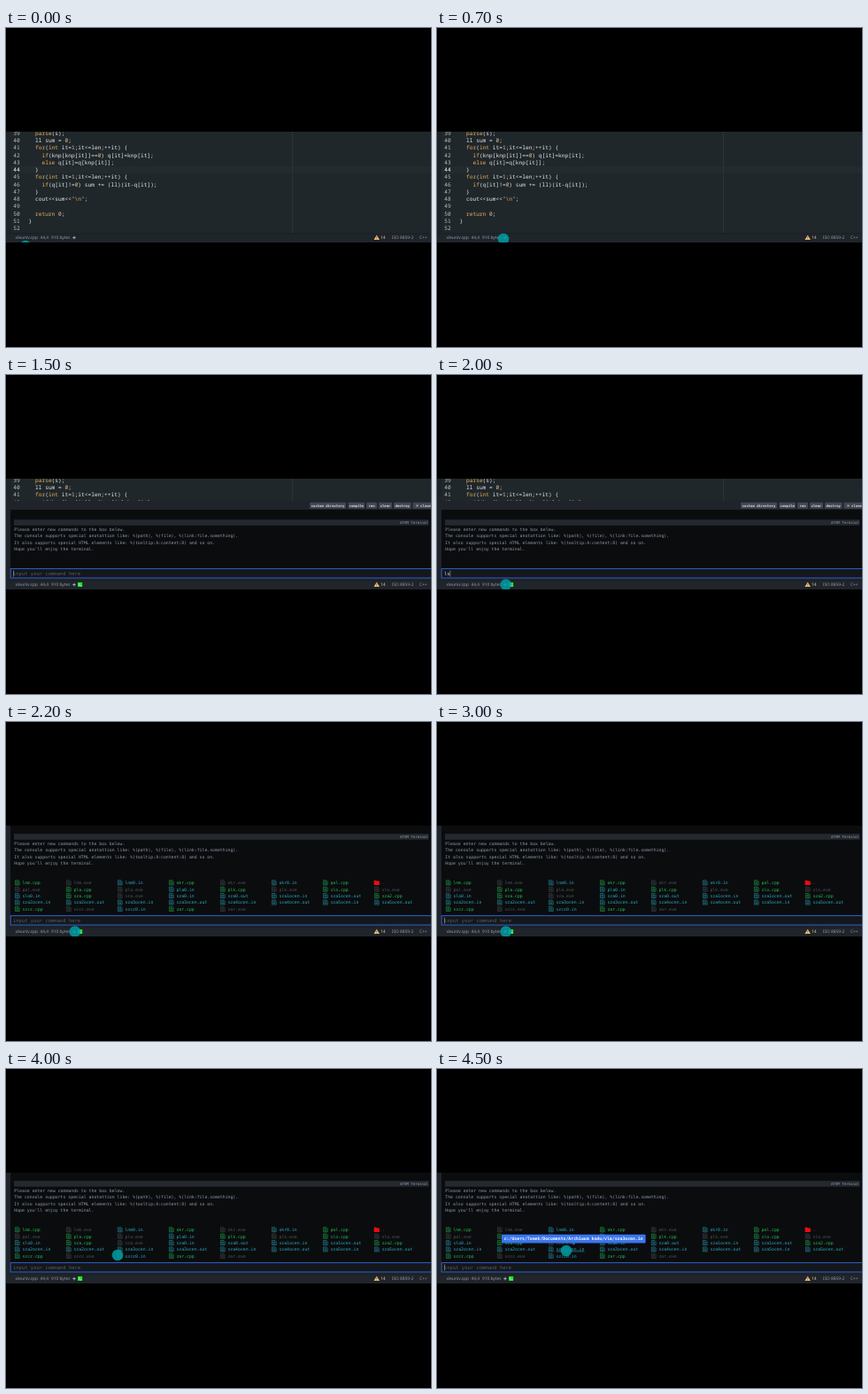
These frames come from a looping animation (480 px wide and 360 px high, 4.7 s). An HTML page:

```html
<!DOCTYPE html>
<html lang="en">
<head>
<meta charset="utf-8">
<title>Editor terminal</title>
<style>
  html, body { margin: 0; width: 100%; height: 100%; overflow: hidden; background: #000; }
  svg { display: block; width: 480px; height: 360px; }
  text { white-space: pre; text-rendering: geometricPrecision; }
  .code { font: 6.2px "Noto Sans Mono", "DejaVu Sans Mono", monospace; fill: #e4e6e6; }
  .term { font: 4.83px "DejaVu Sans Mono", monospace; fill: #8d9aad; }
  .input { font: 5.5px "DejaVu Sans Mono", monospace; }
  .status { font: 4.8px "Noto Sans", "Open Sans", sans-serif; }
  .button { font: bold 3.9px "DejaVu Sans Mono", monospace; fill: #d5d9df; text-anchor: middle; }
</style>
</head>
<body>
<svg id="stage" viewBox="0 0 480 360">
  <defs><clipPath id="strip"><rect y="117" width="480" height="125"/></clipPath></defs>
  <rect width="480" height="360"/>
  <g clip-path="url(#strip)">
    <g id="editor">
      <rect y="117" width="480" height="115" fill="#20272b"/>
      <rect y="117" width="5" height="115" fill="#1d2327"/>
      <rect x="5" y="155.8" width="475" height="8.2" fill="#232b2f"/>
      <rect x="323" y="117" width="1" height="115" fill="#2b3337"/>
    </g>
    <rect id="codeCaret" x="36.8" y="156" width=".8" height="7.6" fill="#e8eaea"/>
    <g id="panel">
      <rect id="panelFrame" width="480" fill="#20242a"/>
      <rect id="panelBody" x="5" width="475" fill="#0b0c0e"/>
      <g id="toolbar"></g>
      <g id="output">
        <rect x="9" y="163.2" width="468.5" height="6.6" fill="#24292f"/>
        <text class="term" x="477" y="168" text-anchor="end" style="font-size:4.1px">ATOM Terminal</text>
      </g>
      <g id="files"></g>
      <rect x="5.2" y="218.6" width="480" height="10.4" fill="#14171c" stroke="#2b5fc8"/>
      <text id="inputText" class="input" x="8" y="226"></text>
      <rect id="inputCaret" y="220.6" width=".6" height="7" fill="#a9b0b8"/>
    </g>
    <g id="statusBar">
      <rect y="232" width="480" height="10" fill="#20252b"/>
      <rect y="231.6" width="480" height=".6" fill="#171b20"/>
      <path d="M418.7 233.7 421.9 239.1H415.5Z" fill="#f3c080"/>
      <path d="M418.7 235.5v1.8M418.7 237.8v.6" stroke="#332a20" stroke-width=".6"/>
    </g>
    <g id="terminalIcon">
      <rect x="81" y="234.1" width="5.2" height="5" rx=".5" fill="#20e028"/>
      <path d="M82 235.4 83.3 236.5 82 237.6M83.8 237.9h1.5" fill="none" stroke="#eaffea" stroke-width=".6"/>
    </g>
    <g id="tooltip">
      <rect x="73" y="186.7" width="162.6" height="9.8" rx="1" fill="#3975ee"/>
      <path d="M152.5 196.4h4l-2 2Z" fill="#3975ee"/>
      <text class="term" x="75.7" y="193.3" style="fill:#fff;font-weight:bold">c:/Users/Tomek/Documents/Archiwum kodu/vla/sza3ocen.in</text>
      <path d="M134.5 205.9h32" stroke="#2ba9bd" stroke-width=".6"/>
    </g>
    <circle id="pointer"/>
  </g>
</svg>
<script>
const LOOP = 4700;
const $ = id => document.getElementById(id);

function add(parent, tag, attrs, content) {
  const node = document.createElementNS("http://www.w3.org/2000/svg", tag);
  for (const key in attrs) node.setAttribute(key, attrs[key]);
  if (content !== undefined) node.textContent = content;
  parent.appendChild(node);
  return node;
}

const source = String.raw`  parse(s);
  ll sum = 0;
  for(int it=1;it<=len;++it) {
    if(knp[knp[it]]==0) q[it]=knp[it];
    else q[it]=q[knp[it]];
  }
  for(int it=1;it<=len;++it) {
    if(q[it]!=0) sum += (ll)(it-q[it]);
  }
  cout<<sum<<"\n";

  return 0;
}
`.split("\n");

function tokenColor(token) {
  if (/^(for|if|else|return|int|parse)$/.test(token)) return "#e9ad57";
  if (/^"/.test(token)) return "#d9a96b";
  if (/^\d+$/.test(token)) return "#e6bd93";
  return "#e4e6e6";
}

source.forEach((line, i) => {
  const y = 120.9 + i * 8.24;
  add($("editor"), "text", { class: "code", x: 8.2, y, style: "fill:" + (i === 5 ? "#fff" : "#b9bfc2") }, 39 + i);
  const text = add($("editor"), "text", { class: "code", x: 25.6, y });
  for (const token of line.match(/"[^"]*"|\w+|\s+|[^\w\s"]+/g) || [])
    add(text, "tspan", { fill: tokenColor(token) }, token);
});

[["custom directory", 343, 41], ["compile", 386.5, 18.5], ["run", 407, 12],
 ["clear", 421, 15], ["destroy", 438, 19.5], ["⌘ close", 459.5, 24]].forEach(([label, x, width]) => {
  add($("toolbar"), "rect", { x, y: 143.8, width, height: 7, rx: .8, fill: "#414750" });
  add($("toolbar"), "text", { class: "button", x: x + width / 2, y: 148.8 }, label);
});

["Please enter new commands to the box below.",
 "The console supports special anotattion like: %(path), %(file), %(link:file.something).",
 "It also supports special HTML elements like: %(tooltip:A:content:8) and so on.",
 "Hope you'll enjoy the terminal."].forEach((line, i) =>
  add($("output"), "text", { class: "term", x: 9.3, y: 175.7 + i * 7.4 }, line));

const fileColors = { cpp: "#23bd55", exe: "#505458", in: "#2ba9bd", out: "#2ba9bd" };
`lnm.cpp lnm.exe lnm0.in okr.cpp okr.exe okr0.in pal.cpp ..
pal.exe pla.cpp pla.exe pla0.in plk.cpp plk.exe slo.cpp slo.exe
slo0.in sza.cpp sza.exe sza0.in sza0.out sza1ocen.in sza1ocen.out sza2.cpp
sza2ocen.in sza2ocen.out sza3ocen.in sza3ocen.out sza4ocen.in sza4ocen.out sza5ocen.in sza5ocen.out
szcz.cpp szcz.exe szcz0.in zar.cpp zar.exe`.split("\n").forEach((row, r) =>
  row.split(" ").forEach((name, c) => {
    const x = 10 + c * 58, y = 181.3 + r * 7.4;
    const folder = name === "..";
    const color = fileColors[name.split(".")[1]] || "#e80d12";
    if (folder) {
      add($("files"), "path", { d: `M${x - .4} ${y - 2.6}h2.6l.8 .9h2.8v4.3h-6.2Z`, fill: color });
    } else {
      add($("files"), "path", {
        d: `M${x + .4} ${y - 2.6}h3.6l1.2 1.2v4h-4.8ZM${x + 1.5} ${y - .6}h2.5M${x + 1.5} ${y + 1}h2.5`,
        fill: color, "fill-opacity": .15, stroke: color, "stroke-opacity": .75, "stroke-width": .6
      });
    }
    add($("files"), "text", { class: "term", x: x + (folder ? 6 : 8.4), y: y + 1.8, style: "fill:" + color }, name);
  }));

[["xleuniv.cpp", 10.6], ["44,4", 38.5], ["910 bytes", 51], ["14", 423, "#e9c497"],
 ["ISO 8859-2", 435.8], ["C++", 467]].forEach(([label, x, color = "#939ba6"]) =>
  add($("statusBar"), "text", { class: "status", x, y: 238.2, style: "fill:" + color }, label));
add($("statusBar"), "path", { d: "M75.3 236.6h3.4M77 234.9v3.4", stroke: "#a4acb7", "stroke-width": 1 });

const within = (t, ...spans) => spans.some(([from, to]) => t >= from && t < to);
const show = (id, visible) => $(id).style.display = visible ? "" : "none";

// Latest entry whose start time has passed.
const latest = (steps, t) => steps.filter(step => step[0] <= t).pop();

const pointerSteps = [
  [0, 22, 246], [100, 22, 250], [500, 58, 243], [700, 75, 238], [1000, 77.8, 236.5],
  [3700, 92, 230], [4000, 126, 210], [4200, 142, 206], [4500, 146, 205]
];
const typingSteps = [[0, ""], [1700, "l"], [2000, "ls"], [2200, ""]];

function draw(t) {
  const open = t >= 1500, listed = t >= 2200;
  show("codeCaret", within(t, [300, 700], [1200, 1500]));
  show("panel", open);
  show("terminalIcon", open);
  show("toolbar", !listed);
  show("files", listed);
  show("tooltip", t >= 4500);

  const top = listed ? 117 : 142;
  const bodyTop = listed ? 117 : 152;
  $("panelFrame").setAttribute("y", top);
  $("panelFrame").setAttribute("height", 232 - top);
  $("panelBody").setAttribute("y", bodyTop);
  $("panelBody").setAttribute("height", 218 - bodyTop);
  $("output").setAttribute("transform", `translate(0 ${listed ? -37 : 0})`);

  const typed = latest(typingSteps, t)[1];
  $("inputText").textContent = typed || "input your command here";
  $("inputText").setAttribute("fill", typed ? "#d0d6de" : "#555c65");
  $("inputCaret").setAttribute("x", 8 + typed.length * 3.31);
  show("inputCaret", within(t, [1500, 2200], [2500, 3200], [3500, 4000], [4500, LOOP]));

  const [, x, y] = latest(pointerSteps, t);
  const clicking = within(t, [1200, 1500]);
  const pointer = { cx: x, cy: y, r: clicking ? 8 : 6.3,
    fill: clicking ? "none" : "#009ca4", "fill-opacity": .85,
    stroke: clicking ? "#1b858d" : "none" };
  for (const key in pointer) $("pointer").setAttribute(key, pointer[key]);
  show("pointer", !within(t, [1500, 1700]));
}

const start = performance.now();
function tick() {
  draw((performance.now() - start) % LOOP);
  requestAnimationFrame(tick);
}
tick();
</script>
</body>
</html>
```
